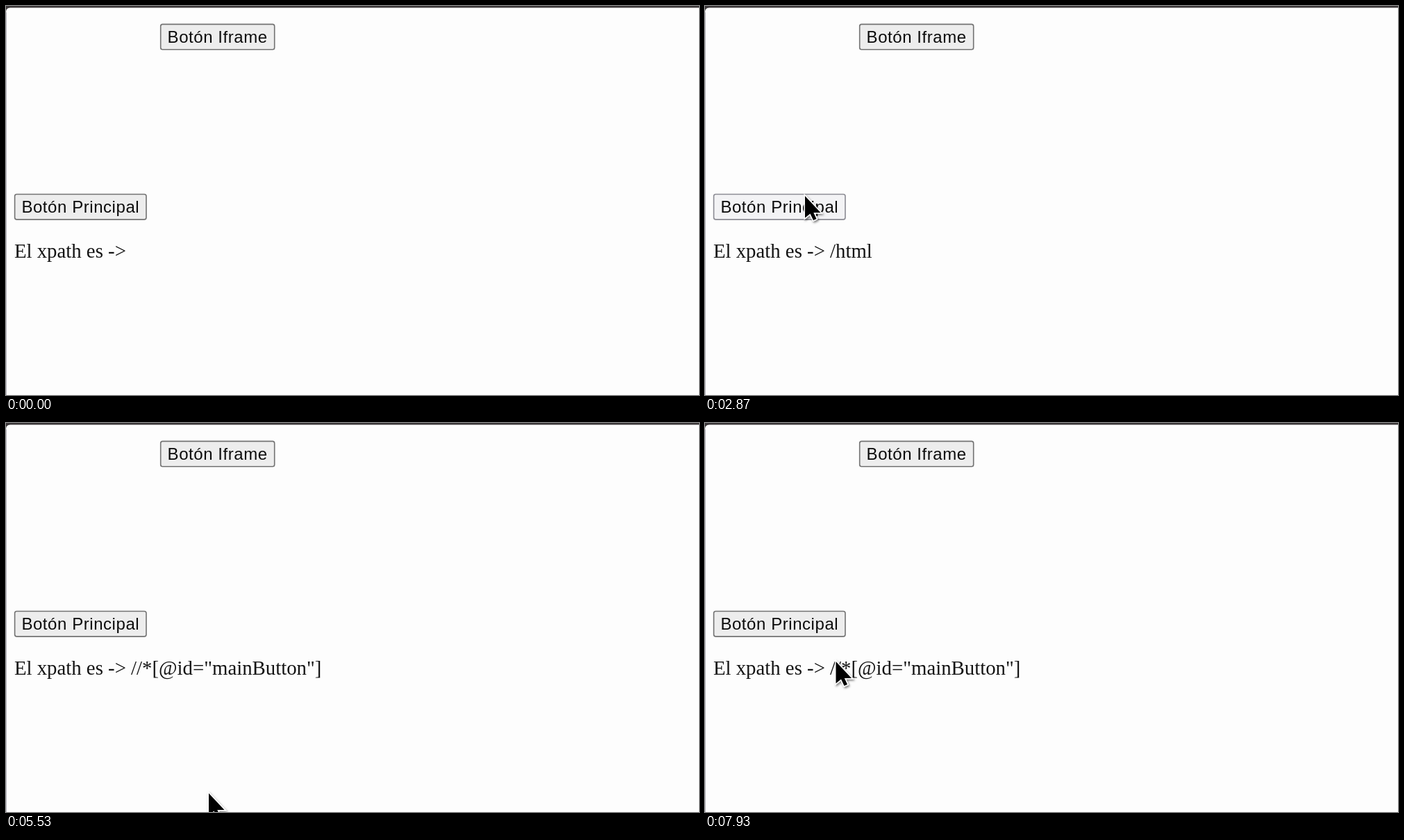
These frames come from a looping animation (998 by 561 pixels, 8 s). An HTML page:

```html
<!DOCTYPE html>
<html lang="es">
<head>
<meta charset="utf-8">
<title>XPath</title>
<style>
  html, body { margin: 0; width: 100%; height: 100%; overflow: hidden; background: #fdfdfd; }
  svg { display: block; width: 998px; height: 561px; }
  .label { font: 24px "Liberation Sans", Arial, sans-serif; letter-spacing: .56px; fill: #0c0c0c; }
  .line { font: 28.8px "Liberation Serif", "Times New Roman", serif; fill: #141414; white-space: pre; }
  .button { stroke-width: 1.6; }
</style>
</head>
<body>
<svg viewBox="0 0 998 561">
  <defs>
    <clipPath id="selClip"><rect id="clipBox" y="338" height="32"/></clipPath>
    <filter id="shadow" x="-50%" y="-50%" width="200%" height="200%">
      <feDropShadow dx="1.5" dy="2" stdDeviation="1.4" flood-opacity=".5"/>
    </filter>
    <path id="beamPath" d="M-5-14.5H-2L0-12.5L2-14.5H5M0-13V13M-5 14.5H-2L0 12.5L2 14.5H5"/>
  </defs>
  <rect width="998" height="561" fill="#3a3638"/>
  <path d="M0 561V9Q0 2.5 6 2.5H998V561Z" fill="#fdfdfd"/>
  <path d="M.5 9V561" stroke="#b9b8c0"/>

  <rect class="button" id="frameBtn" x="222.7" y="26.4" width="164" height="36.4" rx="2.8"/>
  <text class="label" x="232.6" y="52.6">Botón Iframe</text>
  <rect class="button" id="mainBtn" x="12.6" y="271.5" width="189.4" height="36.4" rx="2.8"/>
  <text class="label" x="22.4" y="298">Botón Principal</text>

  <text class="line" id="line" x="11.9" y="362.6"></text>
  <rect id="selBox" y="338" height="32" fill="#2f63cf"/>
  <text class="line" id="selLine" x="11.9" y="362.6" style="fill:#fff" clip-path="url(#selClip)"></text>

  <g id="arrow" filter="url(#shadow)">
    <path d="M0 1V32.5L7.5 26.5L12 36L16.5 34L12.3 25H22.5Z" stroke="#fff" stroke-width="3" paint-order="stroke"/>
  </g>
  <g id="beam" filter="url(#shadow)" fill="none">
    <use href="#beamPath" stroke="#fff" stroke-width="5"/>
    <use href="#beamPath" stroke="#000" stroke-width="2"/>
  </g>
</svg>
<script>
const LOOP = 8000, STEP = 200 / 3, HOLD = 130;
const $ = id => document.getElementById(id);

// Pointer moves: leave and arrive times, destination
const entry = { time: 600, x: 762, y: 384 };
const moves = [
  [600, 1650, 322, 47],
  [1960, 2780, 144, 273],
  [3130, 3530, 318, 44],
  [3800, 3950, 139, 281],
  [4560, 5270, 284, 330],
  [5270, 5530, 292, 533],
  [5530, 6000, 510, 446],
  [6200, 6330, 456, 358],
  [6330, 6530, 17, 365],
  [7070, 7300, 120, 392],
  [7300, 7870, 165, 290],
  [7870, 7930, 188.5, 343]
];
const HTML = "/html", MAIN = '//*[@id="mainButton"]';
const clicks = [[1660, HTML], [2795, MAIN], [3660, HTML], [3960, MAIN]];
const select = { from: 6330, to: 7290 };

const buttons = [$("frameBtn"), $("mainBtn")];
const looks = {
  idle: ["#ededed", "#727272"],
  hover: ["#e2e2e4", "#4b4b52"],
  down: ["#f3f3f5", "#8b8b93"]
};

const ease = u => u * u * (3 - 2 * u);

function pointer(t) {
  let { x, y } = entry;
  for (const [leave, arrive, toX, toY] of moves) {
    if (t < leave) break;
    const k = ease(Math.min(1, (t - leave) / (arrive - leave)));
    x += (toX - x) * k;
    y += (toY - y) * k;
  }
  return { x, y };
}

function inside(el, { x, y }) {
  const b = el.getBBox();
  return x > b.x && x < b.x + b.width && y > b.y && y < b.y + b.height;
}

function setButtons(t, pos, shown) {
  const pressed = clicks.some(([at]) => t >= at && t < at + HOLD);
  for (const el of buttons) {
    const over = shown && inside(el, pos);
    const [fill, stroke] = looks[over ? (pressed ? "down" : "hover") : "idle"];
    el.setAttribute("fill", fill);
    el.setAttribute("stroke", stroke);
  }
}

function setText(t) {
  const last = clicks.filter(([at]) => at + HOLD <= t).pop();
  const text = "El xpath es -> " + (last ? last[1] : "");
  for (const el of [$("line"), $("selLine")])
    if (el.textContent !== text) el.textContent = text;
}

// The selection runs from the end of the line back to the dragged letter.
function setSelection(t) {
  let left = 0, width = 0;
  if (t >= select.from && t < select.to) {
    const line = $("line"), edge = pointer(Math.min(t, 6540)).x;
    let i = line.getNumberOfChars() - 1;
    const end = left = line.getEndPositionOfChar(i).x;
    for (; i >= 0 && line.getStartPositionOfChar(i).x >= edge; i--)
      left = line.getStartPositionOfChar(i).x;
    width = end - left;
  }
  for (const el of [$("selBox"), $("clipBox")]) {
    el.setAttribute("x", left);
    el.setAttribute("width", width);
  }
}

function place(el, { x, y }, shown) {
  el.style.display = shown ? "" : "none";
  el.setAttribute("transform", `translate(${x.toFixed(1)} ${y.toFixed(1)})`);
}

function draw(time) {
  const t = Math.floor((time % LOOP + 4) / STEP) * STEP;
  const pos = pointer(t), shown = t >= entry.time;
  const beam = t >= 6300 && t < 7150;
  setButtons(t, pos, shown);
  setText(t);
  setSelection(t);
  place($("arrow"), pos, shown && !beam);
  place($("beam"), pos, shown && beam);
}

const begin = performance.now();
function tick() {
  draw(performance.now() - begin);
  requestAnimationFrame(tick);
}
tick();
</script>
</body>
</html>
```
